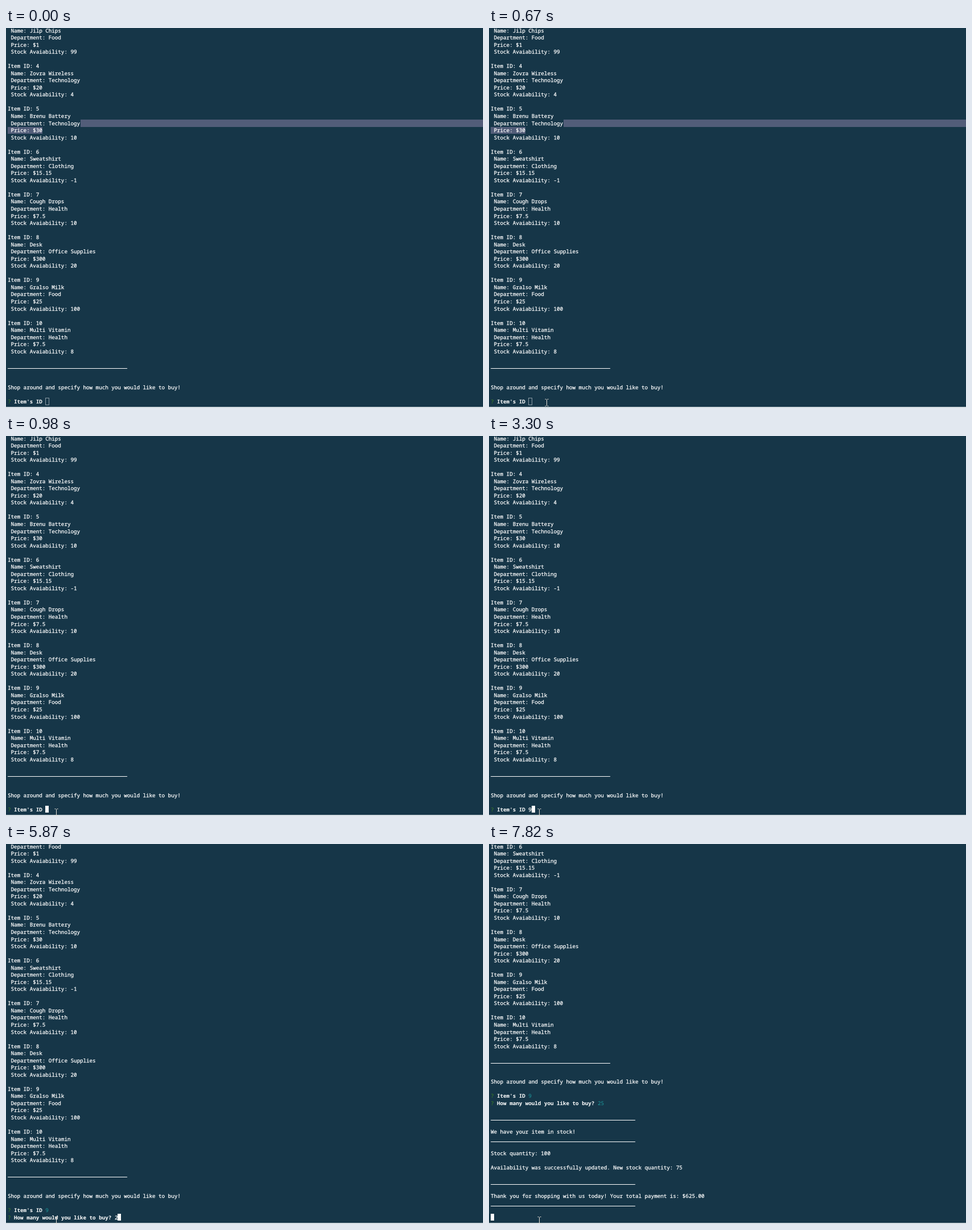
Recreate the animation shown at these times as an HTML page. Size 838 px wide and 668 px high, loop 8000 ms.

```html
<!DOCTYPE html>
<html lang="en">
<head>
<meta charset="utf-8">
<title>Shop terminal</title>
<style>
  html, body { margin: 0; width: 100%; height: 100%; overflow: hidden; background: #163648; }
  svg { display: block; width: 838px; height: 668px; }
  text {
    font: 400 9.21px "Noto Sans Mono", "DejaVu Sans Mono", monospace;
    font-variant-ligatures: none;
    text-rendering: geometricPrecision;
    white-space: pre;
    fill: #fff;
    stroke: #fff;
    stroke-width: .25px;
  }
  .bold { font-weight: 700; stroke: none; }
  .mark { fill: #438a22; stroke: none; }
  .done { fill: #1c9c9f; stroke: none; }
</style>
</head>
<body>
<svg id="stage" viewBox="0 0 838 668">
  <rect width="838" height="668" fill="#163648"/>
  <g id="selection" fill="#525d79" shape-rendering="crispEdges">
    <rect x="130.5" y="161" width="708" height="13"/>
    <rect x="3" y="174" width="61" height="12"/>
  </g>
  <g id="log"></g>
  <rect id="caret" shape-rendering="crispEdges"/>
  <rect y="666" width="838" height="2" fill="#d5dde2"/>
  <path id="mouse" fill="none" stroke="#e6dfd6"
    d="M-3-5.5H-1M1-5.5H3M0-5V6M-3 6.5H-1M1 6.5H3"/>
</svg>
<script>
const LOOP = 8000, LEFT = 3, CELL = 5.526, ROW = 12.54, TOP = -2;
const $ = id => document.getElementById(id);
const log = $("log"), caret = $("caret"), mouse = $("mouse");

const items = [
  [3, "Jilp Chips", "Food", "1", 99],
  [4, "Zovra Wireless", "Technology", "20", 4],
  [5, "Brenu Battery", "Technology", "30", 10],
  [6, "Sweatshirt", "Clothing", "15.15", -1],
  [7, "Cough Drops", "Health", "7.5", 10],
  [8, "Desk", "Office Supplies", "300", 20],
  [9, "Gralso Milk", "Food", "25", 100],
  [10, "Multi Vitamin", "Health", "7.5", 8]
];

const colX = col => LEFT + col * CELL;
const rowY = row => TOP + row * ROW;

function make(tag, attrs, parent) {
  const el = document.createElementNS("http://www.w3.org/2000/svg", tag);
  set(el, attrs);
  return parent.appendChild(el);
}

function set(el, attrs) {
  for (const key in attrs) el.setAttribute(key, attrs[key]);
}

// Every entry is one line of the log, placed by its row.
const lines = [];

function addText(row, str, col = 0, cls = "") {
  const el = make("text", { x: colX(col), class: cls }, log);
  el.textContent = str;
  lines.push({ el, row, drop: 9.5 });
  return el;
}

function addRule(row, cols) {
  const el = make("rect", { x: LEFT, width: Math.round(cols * CELL), height: 1 }, log);
  el.setAttribute("fill", "#fff");
  lines.push({ el, row, drop: 10.6 });
}

function addPrompt(row, question) {
  addText(row, "?", 0, "mark");
  addText(row, question, 2, "bold");
  return addText(row, "", question.length + 3);
}

items.forEach(([id, name, dept, price, stock], i) => {
  const row = i * 6 - 1;
  addText(row, "Item ID: " + id);
  addText(row + 1, "Name: " + name, 1);
  addText(row + 2, "Department: " + dept, 1);
  addText(row + 3, "Price: $" + price, 1);
  addText(row + 4, "Stock Avaiability: " + stock, 1);
});
addRule(47, 38);
addText(50, "Shop around and specify how much you would like to buy!");
const idAnswer = addPrompt(52, "Item's ID");
const countAnswer = addPrompt(53, "How many would you like to buy?");
[55, 58, 64, 67].forEach(row => addRule(row, 46));
addText(57, "We have your item in stock!");
addText(60, "Stock quantity: 100");
addText(62, "Availability was successfully updated. New stock quantity: 75");
addText(66, "Thank you for shopping with us today! Your total payment is: $625.00");

function answer(el, str, done) {
  if (el.textContent !== str) el.textContent = str;
  el.setAttribute("class", done ? "done" : "");
}

function mouseAt(t) {
  if (t < 130) return null;
  if (t >= 980) return [88, 661];
  if (t >= 900) return [93, 660];
  const u = Math.min(7, Math.floor((t - 130) / 77)) / 7;
  const e = 1 - (1 - u) ** 2;
  return [Math.round(445 - 344 * e), Math.round(664 - 6 * e - 4 * Math.sin(Math.PI * e))];
}

function draw(t) {
  const focused = t >= 900;
  const asked = t >= 4080;
  const paid = t >= 7820;
  const scroll = paid ? 17 : asked ? 1 : 0;
  const last = paid ? 69 : asked ? 53 : 52;

  for (const { el, row, drop } of lines) {
    el.setAttribute("y", Math.round(rowY(row - scroll) + drop));
    el.style.display = row > last || row < scroll ? "none" : "";
  }

  const count = t >= 6800 ? "25" : t >= 5870 ? "2" : "";
  answer(idAnswer, t >= 3300 ? "9" : "", asked);
  answer(countAnswer, count, paid);
  $("selection").style.display = focused ? "none" : "";

  const col = paid ? 0 : asked ? 34 + count.length : t >= 3300 ? 13 : 12;
  const x = Math.round(colX(col));
  set(caret, focused
    ? { x, y: 650, width: 6, height: 12, fill: "#fff", stroke: "none" }
    : { x: x + .5, y: 650.5, width: 6, height: 12, fill: "none", stroke: "#8b9ba5" });

  const pos = mouseAt(t);
  mouse.style.display = pos ? "" : "none";
  if (pos) mouse.setAttribute("transform", `translate(${pos[0] + .5} ${pos[1]})`);
}

const start = performance.now();
function tick() {
  draw((performance.now() - start) % LOOP);
  requestAnimationFrame(tick);
}
draw(0);
requestAnimationFrame(tick);
</script>
</body>
</html>
```
